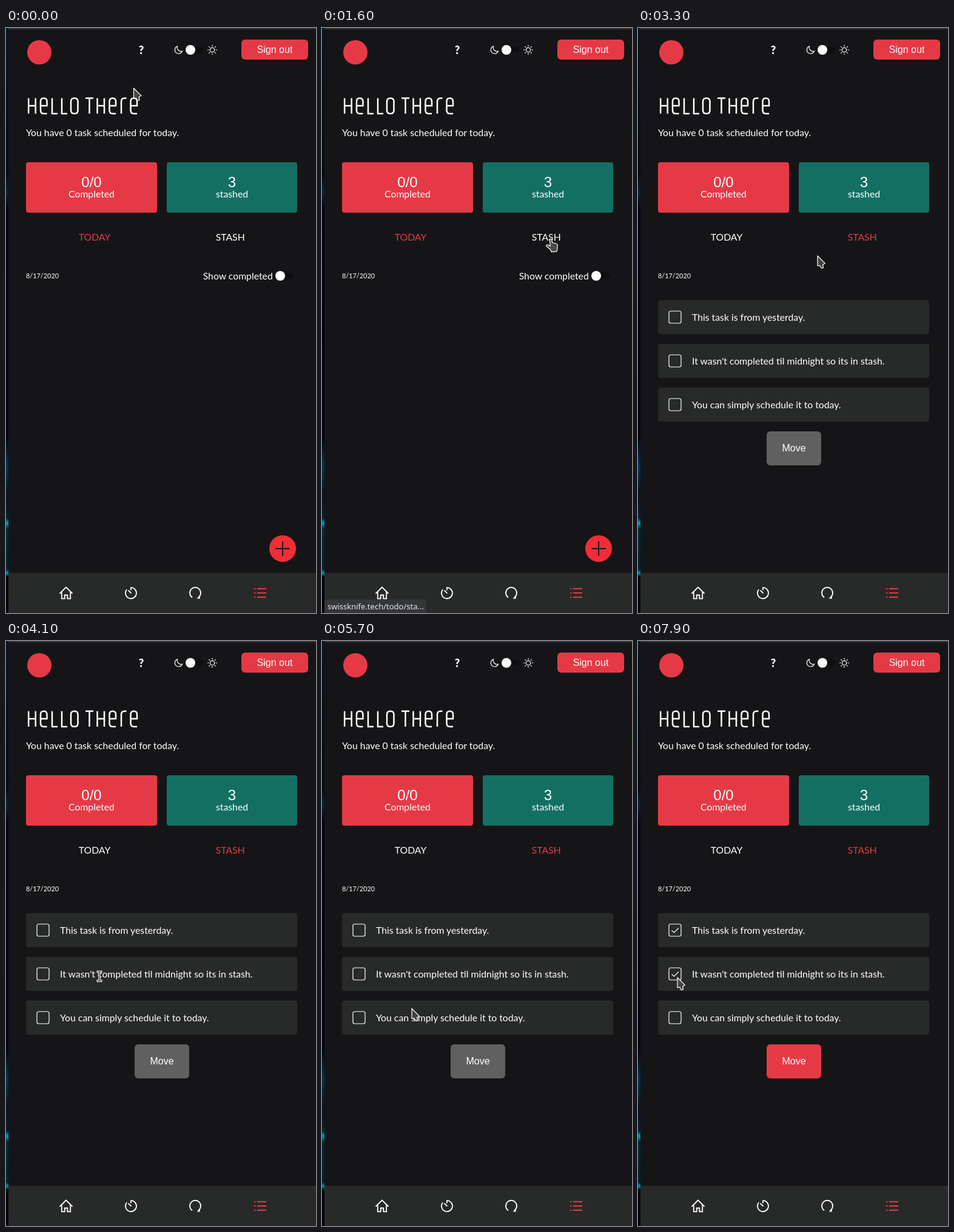
An HTML page for the animation above (8000 ms loop, 511 by 963 pixels).

```html
<!DOCTYPE html>
<html lang="en">
<head>
<meta charset="utf-8">
<title>Task list</title>
<style>
  html, body { margin: 0; width: 100%; height: 100%; overflow: hidden; background: #151517; }
  svg { display: block; width: 100%; height: 100%; }
  text { font: 15.78px Lato, sans-serif; fill: #fff; }
  .sans { font: 16px "Liberation Sans", Arial, sans-serif; }
  .mid { text-anchor: middle; }
  .big { font-size: 24px; }
  .date { font-size: 10.9px; }
  .help { font-size: 18px; font-weight: 900; }
  .url { font: 13px "Noto Sans", sans-serif; fill: #e8eaed; }
  .line { fill: none; stroke: #fff; stroke-width: 1.8; }
  .thin { stroke-width: 1.2; }
  .title { stroke-width: 2.5; }
  .red { fill: #e63946; }
  .panel { fill: #282a29; }
</style>
</head>
<body>
<svg viewBox="0 0 511 963">
  <defs>
    <linearGradient id="edge" x2="0" y2="1">
      <stop offset="0" stop-color="#03182a"/>
      <stop offset=".1" stop-color="#03121f"/>
      <stop offset=".25" stop-color="#020a18"/>
      <stop offset=".28" stop-color="#04243c"/>
      <stop offset=".31" stop-color="#030320"/>
      <stop offset=".5" stop-color="#020218"/>
      <stop offset=".7" stop-color="#02061c"/>
      <stop offset=".75" stop-color="#053450"/>
      <stop offset=".8" stop-color="#031426"/>
      <stop offset=".838" stop-color="#042038"/>
      <stop offset=".846" stop-color="#08a0b4"/>
      <stop offset=".856" stop-color="#04283c"/>
      <stop offset=".925" stop-color="#032034"/>
      <stop offset=".932" stop-color="#0890a8"/>
      <stop offset=".938" stop-color="#020410"/>
      <stop offset="1" stop-color="#020208"/>
    </linearGradient>
    <path id="H" d="M0 0V25.5M11.5 0V25.5M0 12.5H11.5"/>
    <path id="e" d="M0 12.5H10.5V5.5Q10.5 0 5.2 0Q0 0 0 5.5V20Q0 25.5 5.5 25.5H10.5"/>
    <path id="L" d="M0 0V25.5H9"/>
    <path id="O" d="M0 5.5Q0 0 5.7 0Q11.5 0 11.5 5.5V20Q11.5 25.5 5.7 25.5Q0 25.5 0 20Z"/>
    <path id="T" d="M0 0H13M6.5 0V25.5"/>
    <path id="r" d="M0 25.5V5.5Q0 0 5.5 0H8.5"/>
  </defs>

  <rect width="511" height="963" fill="#151517"/>
  <rect width="511" height="2" fill="#37373a"/>
  <rect width="4" height="963" fill="url(#edge)"/>

  <!-- header -->
  <circle class="red" cx="55" cy="40" r="20"/>
  <text class="help mid" x="223" y="42.5">?</text>
  <path class="line thin" d="M282.5 30A6.3 6.3 0 1 0 290.5 38.2A6.5 6.5 0 0 1 282.5 30Z"/>
  <rect x="298" y="31" width="28" height="10" rx="5" fill="#0e0e10"/>
  <circle cx="304" cy="36" r="8" fill="#fff"/>
  <circle class="line thin" cx="340" cy="36" r="3.7"/>
  <path class="line thin" id="rays"/>
  <rect class="red" x="388" y="19" width="110" height="33" rx="6"/>
  <text class="sans mid" x="443" y="41">Sign out</text>

  <text x="35" y="142" style="fill:none">Hello There</text>
  <g class="line title" id="title"></g>
  <text x="33" y="178">You have 0 task scheduled for today.</text>

  <!-- counters and tabs -->
  <rect class="red" x="33" y="221" width="216" height="83" rx="4"/>
  <rect x="265" y="221" width="215" height="83" rx="4" fill="#146f63"/>
  <text class="sans big mid" x="141" y="262">0/0</text>
  <text class="mid" x="141" y="279">Completed</text>
  <text class="sans big mid" x="372.5" y="262">3</text>
  <text class="mid" x="372.5" y="279">stashed</text>
  <text class="mid" x="146" y="350" id="tabToday">TODAY</text>
  <text class="mid" x="369.7" y="350" id="tabStash">STASH</text>
  <text class="date" x="33" y="411.5">8/17/2020</text>

  <g id="today">
    <text x="324.7" y="414">Show completed</text>
    <rect x="446" y="403" width="28" height="10" rx="5" fill="#0e0e10"/>
    <circle cx="452" cy="408" r="8" fill="#fff"/>
    <circle cx="456" cy="857" r="22" fill="#f12d38"/>
    <path d="M445 857H467M456 846V868" stroke="#151517" stroke-width="2" stroke-linecap="round"/>
  </g>

  <g id="stash">
    <g id="tasks"></g>
    <g id="move">
      <rect x="212" y="664" width="90" height="56" rx="6" id="moveBox"/>
      <text class="sans mid" x="257" y="697">Move</text>
    </g>
  </g>

  <!-- bottom bar -->
  <rect class="panel" x="4" y="897" width="507" height="66"/>
  <path class="line" d="M88.5 931L99 920.5L109.5 931M91.8 928.5V939.3H96.7V933.5H101.3V939.3H106.2V928.5"/>
  <path class="line" d="M206 925.5V921.2A9 9 0 1 1 199.2 924.3M206.5 930.5L201.5 925.7"/>
  <path class="line" d="M307 937.4A9 9 0 1 1 317 937.4M318.8 935.2V938.6H315.3"/>
  <path class="line" d="M414 923H429M414 930H429M414 937H429M409 923H411.4M409 930H411.4M409 937H411.4" style="stroke:#e63946"/>

  <g id="status">
    <path d="M4 941H168Q172 941 172 945V963H4Z" fill="#353638"/>
    <text class="url" x="9" y="957">swissknife.tech/todo/sta...</text>
  </g>

  <g id="cursor" stroke-linejoin="round">
    <path id="arrow" d="M0 0V16.5L4 16.2L6.3 20.5L9.6 19.6L8.6 14.8L12.3 12.4Z" fill="#444446" stroke="#fff" stroke-width="1.2"/>
    <path id="hand" d="M.2 1Q2 -1 3.6 1.2L4.6 6.5L11.5 8Q13.3 8.6 13.3 10.5L12.8 16.5L12 20.8L2.8 21.6L1.8 18L-5 12.2Q-5.8 9.6 -3 9.8L1.4 12Z" fill="#4a4a4c" stroke="#fff" stroke-width="1.2"/>
    <g id="beam" fill="none">
      <path d="M-4.5 -7.5H4.5M0 -7.5V7.5M-4.5 7.5H4.5" stroke="#fff" stroke-width="3.4"/>
      <path d="M-3.5 -7.5H3.5M0 -7.5V7.5M-3.5 7.5H3.5" stroke="#151517" stroke-width="1.2"/>
    </g>
  </g>
</svg>
<script>
const LOOP = 8000, STEP = 100, RED = [230, 57, 70], GREY = [96, 96, 96];
const $ = id => document.getElementById(id);

$('rays').setAttribute('d', [...Array(8).keys()].map(i => {
  const c = Math.cos(i * Math.PI / 4), s = Math.sin(i * Math.PI / 4);
  return `M${340 + 5.6 * c} ${36 + 5.6 * s}L${340 + 8 * c} ${36 + 8 * s}`;
}).join(''));

const letters = [['H', 37.2], ['e', 57], ['L', 76], ['L', 92], ['O', 107],
  ['T', 131], ['H', 150.5], ['e', 170.5], ['r', 190], ['e', 205.5]];
$('title').innerHTML = letters.map(([g, x]) => `<use href="#${g}" x="${x}" y="115.5"/>`).join('');

const tasks = ['This task is from yesterday.',
  "It wasn't completed til midnight so its in stash.",
  'You can simply schedule it to today.'];
$('tasks').innerHTML = tasks.map((label, i) => `<g transform="translate(0 ${448 + 72 * i})">
  <rect class="panel" x="33" width="447" height="56" rx="4"/>
  <rect class="line thin" x="51" y="18" width="20" height="20" rx="3"/>
  <path class="line thin" id="check${i}" d="M55.5 28.5L59.5 32L67 24.5"/>
  <text x="89" y="34">${label}</text></g>`).join('');

// time, x, y, pointer shape
const moves = [
  [0, 210.5, 99, 'arrow'], [500, 210.5, 99, 'arrow'], [700, 262, 262, 'arrow'],
  [900, 262, 262, 'arrow'], [1200, 340, 322, 'arrow'], [1400, 370, 341, 'arrow'],
  [1500, 375, 347, 'hand'], [3200, 375, 347, 'hand'], [3300, 296, 375, 'arrow'],
  [3700, 195, 445, 'arrow'], [3900, 168, 515, 'arrow'], [4000, 158, 541, 'beam'],
  [4100, 154, 552, 'beam'], [4400, 158, 553, 'beam'], [4900, 158, 553, 'beam'],
  [5000, 159, 575, 'arrow'], [5100, 160, 604, 'arrow'], [5200, 160, 622, 'beam'],
  [5600, 160, 622, 'beam'], [5700, 148, 605, 'arrow'], [6000, 95, 530, 'arrow'],
  [6400, 64, 481, 'arrow'], [7000, 64, 481, 'arrow'], [7400, 65, 554, 'arrow'],
  [8000, 65, 554, 'arrow']];

// 0 before start, then one value per step, then 1
const ramp = (t, start, ...values) => t < start ? 0 : values[Math.floor((t - start) / STEP)] ?? 1;
const show = (id, on) => $(id).style.display = on ? '' : 'none';
const fade = (id, a) => $(id).style.opacity = a;

function drawCursor(t) {
  const i = moves.findLastIndex(m => m[0] <= t);
  const a = moves[i], b = moves[i + 1];
  const k = (t - a[0]) / (b[0] - a[0]);
  const x = a[1] + (b[1] - a[1]) * k, y = a[2] + (b[2] - a[2]) * k;
  $('cursor').setAttribute('transform', `translate(${x} ${y})`);
  for (const s of ['arrow', 'hand', 'beam']) show(s, s === a[3]);
}

function draw(now) {
  const t = Math.floor(now % LOOP / STEP) * STEP;
  const stash = t >= 2100;
  show('today', !stash);
  show('stash', stash);
  $('tabToday').style.fill = stash ? '#fff' : '#e63946';
  $('tabStash').style.fill = stash ? '#e63946' : '#fff';
  fade('status', ramp(t, 1600) - ramp(t, 2100, .25, .7));
  fade('move', ramp(t, 2100, .3, .8));
  fade('check0', ramp(t, 6800, .5));
  fade('check1', ramp(t, 7800, .5));
  fade('check2', 0);
  const hot = ramp(t, 6800, .5);
  $('moveBox').style.fill = `rgb(${GREY.map((g, i) => g + (RED[i] - g) * hot)})`;
  drawCursor(t);
}

function tick() {
  draw(performance.now());
  requestAnimationFrame(tick);
}
tick();
</script>
</body>
</html>
```
